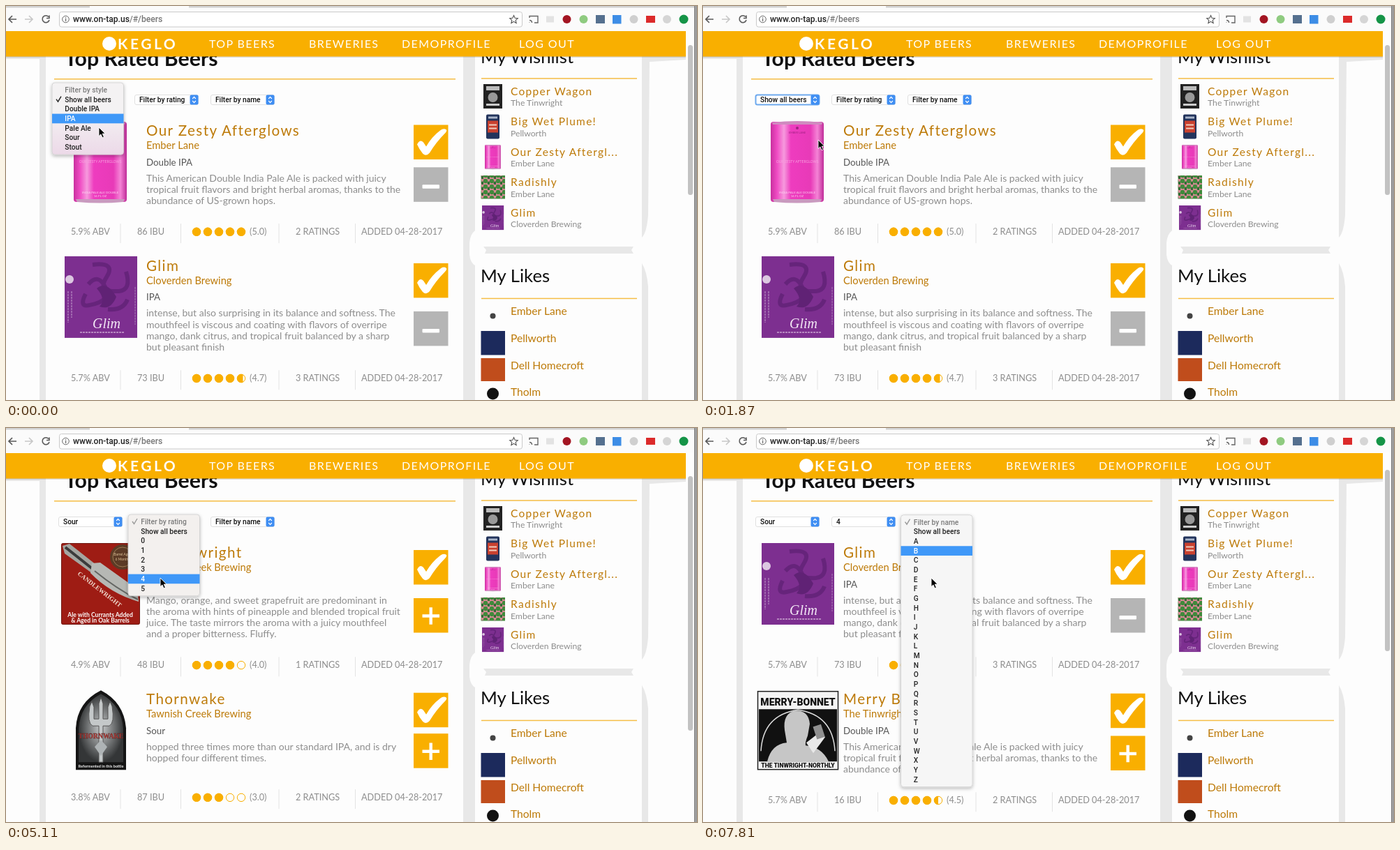
Recreate the animation shown at these times as an HTML page. Size 990x565 px, loop 8 s.

```html
<!DOCTYPE html>
<html lang="en">
<head>
<meta charset="utf-8">
<title>Top Rated Beers</title>
<style>
  html, body { margin: 0; width: 100%; height: 100%; overflow: hidden; background: #fdfdfd; }
  svg { display: block; font-family: Lato, sans-serif; }
  .ui, .heavy { font-family: Roboto, "Liberation Sans", sans-serif; }
  .ui { font-weight: 500; }
  .heavy { font-weight: 900; }
  .serif { font-family: "Liberation Serif", serif; }
</style>
</head>
<body>
<svg id="stage" width="990" height="565" viewBox="0 0 990 565"></svg>
<script>
const GOLD = '#f9af00', BROWN = '#bd7a08', GREY = '#8d8d8d';

const text = (x, y, s, size, fill, extra = '') =>
  `<text x="${x}" y="${y}" font-size="${size}" fill="${fill}" ${extra}>${s}</text>`;
const rect = (x, y, w, h, fill, extra = '') =>
  `<rect x="${x}" y="${y}" width="${w}" height="${h}" fill="${fill}" ${extra}/>`;
const circle = (x, y, r, fill, extra = '') =>
  `<circle cx="${x}" cy="${y}" r="${r}" fill="${fill}" ${extra}/>`;
const path = (d, fill, extra = '') => `<path d="${d}" fill="${fill}" ${extra}/>`;
const line = (d, color, width, extra = '') =>
  path(d, 'none', `stroke="${color}" stroke-width="${width}" ${extra}`);
const at = (x, y, body, more = '') => `<g transform="translate(${x} ${y}) ${more}">${body}</g>`;
const mid = 'text-anchor="middle"';
const bold = 'font-weight="700"';
const ui = 'class="ui"';

// Label pictures, each drawn from its own top left corner
const art = {
  can: [97, rect(0, 1, 76, 115, 'url(#pink)', 'rx="4"') +
    path('M2 2Q38 -2 74 2L73 5H3Z', '#cf8abf') + path('M3 112H73L71 116Q38 119 5 116Z', '#c99abf') +
    circle(38, 10, 2, '#9d2480') + text(38, 18, 'EMBER LANE', 4, '#a32285', mid) +
    text(38, 60, 'OUR ZESTY AFTERGLOWS', 5, '#f7a3df', mid) +
    text(38, 104, 'INDIA PALE ALE DOUBLE', 4.5, '#fbd2ef', mid) +
    text(38, 109, '16 FL OZ', 4.5, '#fbd2ef', mid)],
  purple: [84, rect(0, 0, 104, 117, '#7d2f90') +
    line('M40 12Q74 8 60 30T78 50Q96 48 88 22M34 40Q48 24 58 44T36 70Q20 74 30 54M62 76Q84 78 90 62', '#5f2174', 6, 'opacity=".75"') +
    path('M46 46Q60 34 74 58Q66 78 50 72Q60 62 46 46Z', '#602275') +
    circle(7, 33, 6, '#dcc7e1') +
    line('M5 50V95M10 50V88', '#ac7bb8', 1.5, 'stroke-dasharray="3 1"') +
    line('M101 44V98', '#ac7bb8', 1, 'stroke-dasharray="3 1"') +
    text(40, 103, 'Glim', 20, '#f3e8f5', 'class="serif" font-style="italic"') +
    line('M22 109H86', '#c9a4d1', 1.5, 'stroke-dasharray="3 1"')],
  red: [79, rect(0, 0, 113, 117, '#9e1c14', 'rx="3"') +
    rect(.5, .5, 112, 116, 'none', 'rx="3" stroke="#6e1a14"') +
    circle(88, 20, 18, '#5c3b26') + circle(88, 20, 14, 'none', 'stroke="#9c7c55"') +
    text(88, 18, 'Barrel Aged', 5, '#e0c49b', mid) + text(88, 25, '6 Months', 5, '#e0c49b', mid) +
    path('M2 4L12 1L50 31L44 43L5 15Z', '#a5a5a0') + line('M6 6L45 37', '#3b3b3b', 4) +
    path('M44 29L56 28L109 66L111 84Q70 72 42 43Z', '#b6b8b4') + line('M48 40Q80 66 110 81', '#646663', 2) +
    text(0, 0, 'CANDLEWRIGHT', 9, '#f1dfd2', `class="serif" ${bold} transform="translate(23 45) rotate(38)"`) +
    text(56, 106, 'Ale with Currants Added', 8.6, '#fff', mid + ' ' + bold) +
    text(56, 114, '&amp; Aged in Oak Barrels', 8.6, '#fff', mid + ' ' + bold)],
  arch: [99, path('M1 115V55Q3 18 37 1Q70 18 73 55V115Z', '#151515') +
    path('M5 104V56Q7 22 37 6Q67 22 69 56V104Z', 'url(#glow)') +
    path('M34 104V52H25Q17 48 21 24L24 17L27 25V42H34V20L37 11L40 20V42H47V25L50 17L53 24Q57 48 49 52H40V104Z', '#c4c8c9', 'stroke="#555"') +
    path('M28 82L37 72L46 82L37 95Z', '#aeb3b5') +
    text(37, 70, 'THORNWAKE', 9.6, '#b83a35', `class="serif" ${mid} ${bold} stroke="#571c1b" stroke-width=".3"`) +
    text(37, 112, 'Refermented in this bottle', 5.6, '#eee', mid + ' ' + bold)],
  inked: [78, rect(.5, 2.5, 115, 112, '#f4f4f4', 'stroke="#222" stroke-width="1.5"') +
    path('M2 28H114V103H2Z', '#111') + line('M5 88Q8 36 58 29Q108 36 111 88', '#ddd', 1.5) +
    path('M14 103Q20 78 42 76L39 58Q36 34 54 30Q73 29 75 49L72 66Q68 76 69 80Q92 82 102 103Z', '#c6c6c6') +
    path('M70 76L88 62L97 68L80 91Z', '#e8e8e8') + rect(82, 51, 12, 19, '#909090', 'transform="rotate(-18 88 60)"') +
    text(58, 23, 'MERRY-BONNET', 14, '#111', `class="heavy" ${mid}`) +
    text(58, 111.5, 'THE TINWRIGHT-NORTHLY', 8.6, '#111', `class="heavy" ${mid}`)]
};

const citrus = ['This American Double India Pale Ale is packed with juicy',
  'tropical fruit flavors and bright herbal aromas, thanks to the', 'abundance of US-grown hops.'];
const beers = {
  zesty: { pic: 'can', name: 'Our Zesty Afterglows', by: 'Ember Lane', style: 'Double IPA', about: citrus,
    abv: 5.9, ibu: 86, score: 5, votes: 2, wished: true },
  glim: { pic: 'purple', name: 'Glim', by: 'Cloverden Brewing', style: 'IPA', abv: 5.7, ibu: 73, score: 4.7, votes: 3, wished: true,
    about: ['intense, but also surprising in its balance and softness. The',
      'mouthfeel is viscous and coating with flavors of overripe',
      'mango, dank citrus, and tropical fruit balanced by a sharp', 'but pleasant finish'] },
  candle: { pic: 'red', name: 'Candlewright', by: 'Tawnish Creek Brewing', style: 'Sour', abv: 4.9, ibu: 48, score: 4, votes: 1,
    about: ['Mango, orange, and sweet grapefruit are predominant in',
      'the aroma with hints of pineapple and blended tropical fruit',
      'juice. The taste mirrors the aroma with a juicy mouthfeel', 'and a proper bitterness. Fluffy.'] },
  thorn: { pic: 'arch', name: 'Thornwake', by: 'Tawnish Creek Brewing', style: 'Sour', abv: 3.8, ibu: 87, score: 3, votes: 2,
    about: ['hopped three times more than our standard IPA, and is dry', 'hopped four different times.'] },
  bonnet: { pic: 'inked', name: 'Merry Bonnet', by: 'The Tinwright', style: 'Double IPA', about: citrus,
    abv: 5.7, ibu: 16, score: 4.5, votes: 2 }
};

const pages = [
  { list: ['zesty', 'glim'], thumb: [56, 271], picks: ['Show all beers', 'Filter by rating'] },
  { list: ['candle', 'thorn'], thumb: [69, 434], picks: ['Sour', 'Filter by rating'] },
  { list: ['glim', 'bonnet'], thumb: [60, 320], picks: ['Sour', '4'] }
];

const menus = [null,
  { x: 66, y: 110, check: 1, fill: 'url(#tint)', items: ['Filter by style', 'Show all beers', 'Double IPA', 'IPA', 'Pale Ale', 'Sour', 'Stout'] },
  { x: 175, y: 124, check: 0, fill: '#f3f0ee', items: ['Filter by rating', 'Show all beers', ...'012345'] },
  { x: 283.5, y: 124.7, check: 0, fill: '#f6f6f6', items: ['Filter by name', 'Show all beers', ...'ABCDEFGHIJKLMNOPQRSTUVWXYZ'] }
];

// time, page, open menu, lit row, pointer x, y, options
const steps = [
  [0, 0, 1, 3, 133, 174], [260, 0, 1, 4, 140, 177], [530, 0, 1, 4, 150, 183], [800, 0, 1, 5, 157, 190],
  [1340, 0, 1, 5, 165, 192], [1610, 0, 0, -1, 165, 192, { focus: 1 }], [1880, 1, 0, -1, 165, 192, { focus: 1 }],
  [2150, 1, 0, -1, 178, 186, { focus: 1, hand: 1, status: 1 }], [2420, 1, 0, -1, 205, 170, { focus: 1, hand: 1, status: 1 }],
  [2680, 1, 0, -1, 226, 152, { focus: 1, status: .2 }], [2950, 1, 0, -1, 230, 140, { focus: 1 }],
  [3220, 1, 0, -1, 230, 134, { focus: 1 }], [3490, 1, 2, -1, 230, 136], [3760, 1, 2, 3, 225, 190],
  [4030, 1, 2, 4, 219, 247], [4300, 1, 2, 7, 219, 236], [4570, 1, 2, 6, 220, 222], [5110, 1, 2, 6, 221, 215],
  [5380, 1, 0, -1, 221, 215, { focus: 2 }], [5650, 2, 0, -1, 221, 215, { focus: 2 }],
  [5920, 2, 0, -1, 219, 216, { focus: 2, hand: 1 }], [6460, 2, 0, -1, 236, 204, { focus: 2, hand: 1 }],
  [6730, 2, 0, -1, 290, 160, { focus: 2 }], [7000, 2, 0, -1, 332, 140, { focus: 2 }],
  [7270, 2, 3, -1, 332, 138], [7540, 2, 3, 1, 330, 165], [7810, 2, 3, 3, 327, 215]
];

const tick = path('M5 28Q9 20 14 25L18 31Q26 17 38 8Q43 4 47 7Q48 9 45 12Q32 25 23 40Q18 46 13 41Q8 35 5 28Z', '#fff');
const minus = rect(12.5, 25, 24.5, 5.5, '#fff', 'rx="1"');
const plus = line('M12.5 25.5H37M24.7 13.2V37.8', '#fff', 4.4);
const button = (y, fill, icon) => at(584, y, rect(0, 0, 49.5, 49.5, fill) + icon);

function dots(score, y) {
  const r = 6.2;
  let out = '';
  for (let i = 0; i < 5; i++) {
    const x = 273 + 16 * i, part = Math.max(0, Math.min(1, score - i));
    out += circle(x, y, r - .5, 'none', `stroke="${GOLD}"`);
    if (part === 1) out += circle(x, y, r, GOLD);
    else if (part) {
      const edge = r * (2 * part - 1), h = Math.sqrt(r * r - edge * edge);
      out += path(`M${x + edge} ${y - h}A${r} ${r} 0 ${part > .5 ? 1 : 0} 0 ${x + edge} ${y + h}Z`, GOLD);
    }
  }
  return out;
}

const statsY = beer => Math.max(324, 279.2 + 16.3 * beer.about.length);

function card(beer, top) {
  const n = beer.about.length, base = statsY(beer), [left, picture] = art[beer.pic];
  const [first, second] = { 2: [169.5, 228], 3: [170.5, 231.3], 4: [175, 244] }[n];
  const stat = (x, s) => text(x, base, s, 12.7, GREY);
  return at(0, top, at(left, 165, picture) +
    text(201, 186, beer.name, 20.6, BROWN, 'letter-spacing="1.4"') +
    text(201, 205, beer.by, 14.7, BROWN) + text(201, 228.5, beer.style, 13.3, '#555') +
    beer.about.map((s, i) => text(201, 251.5 + 16.3 * i, s, 14, GREY)).join('') +
    stat(93, beer.abv + '% ABV') + stat(188, beer.ibu + ' IBU') + stat(349, `(${beer.score.toFixed(1)})`) +
    stat(415, beer.votes + ' RATINGS') + stat(509, 'ADDED 04-28-2017') + dots(beer.score, base - 4.3) +
    [164, 250.5, 391, 500.5].map(x => rect(x - .5, base - 16, 1, 28, '#e3e3e3')).join('') +
    button(first, GOLD, tick) +
    (beer.wished ? button(second, '#b5b5b5', minus) : button(second, GOLD, plus)));
}

function select(x, label, focused) {
  return rect(x, 127.5, 91, 14, '#fff', `rx="2.5" stroke="${focused ? '#6ea9ee' : '#e0e0e0'}" stroke-width="${focused ? 2 : 1}"`) +
    rect(x + 79, 127.5, 12, 14, '#3f8ef3', 'rx="2"') +
    line(`M${x + 82.7} 133l2.3 -2.6l2.3 2.6m0 3l-2.3 2.6l-2.3 -2.6`, '#fff', 1.2) +
    text(x + 6.5, 138.4, label, 10.2, '#111', ui);
}

function menu({ x, y, check, fill, items }, lit) {
  const row = 13.66, h = items.length * row + 7.5;
  const rows = items.map((s, i) => {
    const base = 14 + row * i;
    return (i === lit ? rect(0, base - 10.4, 102.5, 13.7, '#3f98f8') : '') +
      text(18.3, base, s, 10.2, i === lit ? '#fff' : i ? '#222' : '#7c7c7c', ui);
  }).join('');
  const cy = 10 + row * check;
  return at(x, y, rect(0, 0, 102.5, h, fill, 'rx="4" stroke="#cfcfcf" stroke-width=".8" filter="url(#shade)"') + rows +
    line(`M6 ${cy}l2.5 3.5l4.5 -7.5`, check ? '#222' : '#999', 1.4));
}

const arrow = path('M0 0V12.6L2.9 9.9L5.1 14.8L7.3 13.8L5.2 9.1H9.2Z', '#000', 'stroke="#fff" stroke-width=".9"');
const hand = path('M2 1Q3.6 0 4.3 2L5.3 5.6L6.5 5.1Q7.7 5 8 6L9.4 5.8Q10.3 6 10.5 7Q12 6.9 12.1 8.6L11.8 12L10.4 15H4.6L.2 10.2Q-.8 8.6 .7 8.2L3 9.6L1.2 3Q1 1.6 2 1Z',
  '#fff', 'stroke="#000" stroke-width="1.1"');

function scene([, pageNo, open, lit, x, y, { focus = 0, hand: pointing, status } = {}]) {
  const page = pages[pageNo], [a, b] = page.list.map(key => beers[key]), [top, end] = page.thumb;
  return card(a, 0) + card(b, statsY(a) - 134.2) +
    select(75.5, page.picks[0], focus === 1) + select(184.5, page.picks[1], focus === 2) + select(293.5, 'Filter by name') +
    rect(977, top, 7, end - top, '#c2c2c2', 'rx="3.5"') +
    (status ? `<g opacity="${status}">${rect(-2, 550, 124, 16, '#f1f1f1', 'stroke="#ccc"')}${text(-2, 562, 'www.on-tap.us/#/beers/60', 10.4, '#777', ui)}</g>` : '') +
    (open ? menu(menus[open], lit) : '') + at(x, y, pointing ? hand : arrow);
}

function backdrop() {
  const gap = '#e8e8e8';
  const wishes = [['Copper Wagon', 'The Tinwright'], ['Big Wet Plume!', 'Pellworth'], ['Our Zesty Aftergl...', 'Ember Lane'],
    ['Radishly', 'Ember Lane'], ['Glim', 'Cloverden Brewing']];
  const thumbs = [
    at(684, 112, rect(0, 0, 27, 35, '#222') + rect(4, 3, 19, 6, '#bbb') + circle(13.5, 19, 7, '#999') + rect(4, 28, 19, 3, '#ccc')),
    at(688, 155.5, rect(0, 0, 19, 35, '#23345c', 'rx="2"') + rect(2, 9, 15, 17, '#c9412f') + rect(3, 3, 13, 3, '#a9b5ca') + rect(4, 14, 11, 2, '#f0cdbd') + rect(4, 19, 11, 2, '#f0cdbd')),
    at(686, 199, art.can[1], 'scale(.3)'),
    rect(680.5, 243, 34.5, 33.5, 'url(#leaves)'),
    at(682, 286, art.purple[1], 'scale(.3)')
  ];
  const nav = (x, s) => text(x, 60, s, 16, '#fff', 'letter-spacing="1.4"');
  const likes = ['Ember Lane', 'Pellworth', 'Dell Homecroft', 'Tholm'];
  return `<defs>
    <linearGradient id="pink"><stop stop-color="#c9309f"/><stop offset=".12" stop-color="#f04cc4"/><stop offset=".25" stop-color="#f69add"/>
      <stop offset=".38" stop-color="#ee3cbf"/><stop offset=".75" stop-color="#e83ab8"/><stop offset=".88" stop-color="#f583d6"/><stop offset="1" stop-color="#bf2b98"/></linearGradient>
    <linearGradient id="tint" x2="0" y2="1"><stop offset=".4" stop-color="#f4f2f3"/><stop offset="1" stop-color="#ecd9e8"/></linearGradient>
    <radialGradient id="glow"><stop stop-color="#c9cccd"/><stop offset="1" stop-color="#343637"/></radialGradient>
    <pattern id="leaves" width="9" height="8" patternUnits="userSpaceOnUse">${rect(0, 0, 9, 8, '#d58a94')}${circle(3, 3, 3.2, '#3f8a3b')}${circle(8, 6, 2.4, '#2f6d33')}</pattern>
    <filter id="shade" x="-20%" y="-20%" width="140%" height="140%"><feDropShadow dx="0" dy="2" stdDeviation="2.5" flood-opacity=".28"/></filter>
  </defs>` + rect(0, 0, 990, 565, '#fdfdfd') +
    // page gutters
    rect(48, 72, 9, 493, gap) + rect(0, 72, 57, 4, gap) +
    path('M655 72H672V322Q665 327 664 340V356Q665 368 672 372V565H655Z', gap) +
    path('M684 345H899L896 350L899 355H686L688 350Z', gap) +
    path('M911 72H974V77L922 80L920 300Q918 325 911 332Z', gap) + path('M911 369Q918 380 920 402V565H911Z', gap) +
    text(84, 86, 'Top Rated Beers', 30.3, '#111', bold) + text(680, 82, 'My Wishlist', 25.7, '#111') +
    rect(69, 104, 575, 1.5, '#f5bd45') + rect(681, 103.2, 223, 1.5, '#f5bd45') +
    wishes.map(([name, by], i) => text(723, 128 + 43.4 * i, name, 15.5, BROWN, 'letter-spacing="1.3"') +
      text(723, 143.4 + 43.4 * i, by, 12.2, GREY)).join('') + thumbs.join('') +
    text(680, 396, 'My Likes', 25.7, '#111') + rect(681, 418.7, 223, 1.5, '#f5bd45') +
    likes.map((name, i) => text(723, 443.3 + 38.7 * i, name, 15.6, BROWN)).join('') +
    circle(697.5, 444.5, 4, '#444') + rect(680.5, 466, 34.5, 34.5, '#1c2a5c') + rect(680.5, 505, 34.5, 33, '#c04d1c') + circle(697.5, 556, 8.5, '#111') +
    // site header
    rect(0, 72, 974, 2, '#000', 'opacity=".12"') + rect(0, 36, 974, 36.5, GOLD) +
    circle(148, 54, 10, '#fff') + text(160, 62, 'KEGLO', 21, '#fff', bold + ' letter-spacing="3.5"') +
    nav(291, 'TOP BEERS') + nav(434, 'BREWERIES') + nav(567, 'DEMOPROFILE') + nav(735, 'LOG OUT') +
    // browser frame
    rect(0, 0, 990, 35.5, '#fbfbfb') + rect(0, 0, 120, 2.5, '#d2d2d2') + rect(262, 0, 724, 2.5, '#d2d2d2') +
    line('M15 19H4M9 14L4 19L9 24', '#5a5a5a', 1.7) + line('M27 19H38M33 14L38 19L33 24', '#c8c8c8', 1.7) +
    line('M61 15.5A5 5 0 1 0 62 20M62 13.5V17.5H58', '#5a5a5a', 1.6) +
    rect(76.5, 8.5, 663, 21.5, '#fff', 'rx="3" stroke="#cacaca"') +
    circle(85.5, 19, 4.8, 'none', 'stroke="#666"') + rect(85, 18, 1.2, 4, '#666') + rect(85, 16, 1.2, 1.2, '#666') +
    text(96, 23, 'www.on-tap.us<tspan fill="#777">/#/beers</tspan>', 12.1, '#222', ui) +
    path('M727.5 13.5L729.2 17.3L733.3 17.7L730.2 20.4L731.1 24.5L727.5 22.3L723.9 24.5L724.8 20.4L721.7 17.7L725.8 17.3Z', 'none', 'stroke="#555" stroke-width="1.1"') +
    line('M750 17V14.5H762V24H757M750 20.5Q753.5 20.5 753.5 24M750 23.5V24', '#666', 1.4) +
    rect(774, 14.5, 11, 9, '#e3e3e3') + circle(803.5, 19, 6, '#a31522') + circle(827.5, 19, 6, '#8fcb80') +
    rect(845, 13, 13, 12, '#55708f') + rect(869, 13, 12.5, 12.5, '#3d8de6') + circle(899.5, 19, 6, '#cfcfcf') +
    rect(917, 14, 13, 10, '#dc2a2a') + circle(947, 19, 6, '#d5d5d5') + circle(971, 19, 6.5, '#159447') +
    rect(986, 0, 1.5, 565, '#777') + rect(987.5, 0, 2.5, 565, '#9a9a9a') + '<g id="live"></g>';
}

document.getElementById('stage').innerHTML = backdrop();
const live = document.getElementById('live');
let shown = null;
function frame() {
  const t = performance.now() % 8000;
  const step = steps.findLast(s => s[0] <= t);
  if (step !== shown) live.innerHTML = scene(shown = step);
  requestAnimationFrame(frame);
}
frame();
</script>
</body>
</html>
```
